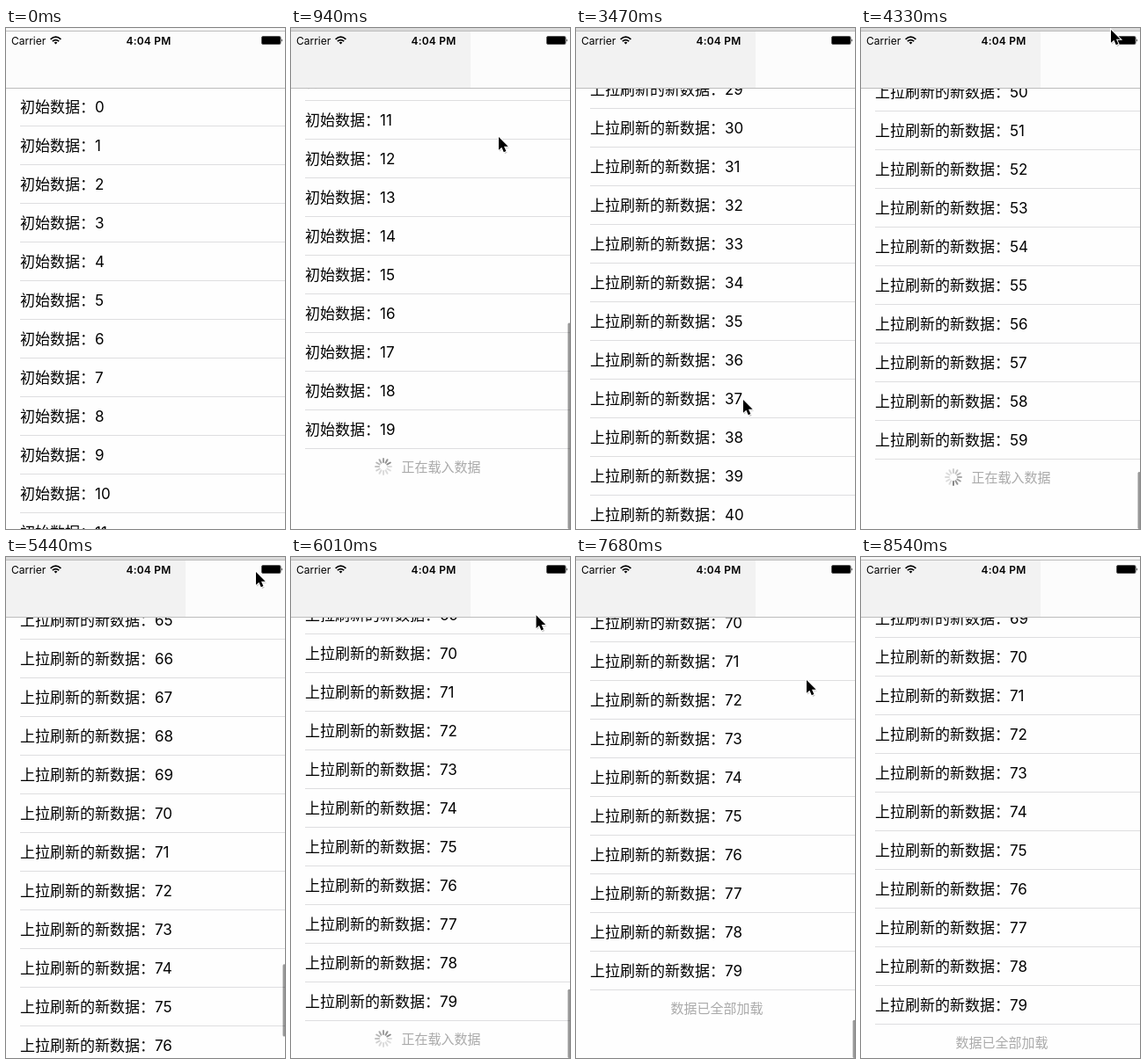
Write an HTML page that moves like this. It is 317 px wide and 570 px high and loops after 8580 ms.

```html
<!DOCTYPE html>
<html lang="zh-CN">
<head>
<meta charset="utf-8">
<title>List</title>
<style>
html, body { margin: 0; width: 100%; height: 100%; overflow: hidden; background: #fefefe; }
svg { display: block; width: 317px; height: 570px; }
text { font-family: Inter, "Noto Sans CJK SC", "Noto Sans CJK", sans-serif; font-size: 17px; fill: #000; white-space: pre; }
.foot { font-size: 15px; fill: #aaa; }
.status { font-size: 12px; }
</style>
</head>
<body>
<svg viewBox="0 0 317 570">
  <rect width="317" height="570" fill="#fefefe"/>
  <g id="rows"></g>
  <g id="footer">
    <g id="spinner" transform="translate(105 20)"></g>
    <text id="loading" class="foot" x="125.5" y="26">正在载入数据</text>
    <text id="done" class="foot" x="160" y="26" text-anchor="middle">数据已全部加载</text>
  </g>
  <rect id="bar" x="314.5" width="3" rx="1.5" fill="#000" fill-opacity=".4"/>
  <rect width="317" height="68" fill="#fcfcfc"/>
  <rect id="shade" y="4" width="204" height="64" fill="#f2f2f2"/>
  <rect y="68" width="317" height="1" fill="#bcbcbc"/>
  <rect id="strip" width="317" height="3"/>
  <rect y="3" width="317" height="1" fill="#bdbdbd"/>
  <text class="status" x="6" y="18.5">Carrier</text>
  <g fill="none" stroke="#000" stroke-width="1.7">
    <path d="M50.6 12.9Q56.5 7.5 62.4 12.9M52.8 15.2Q56.5 11.9 60.2 15.2"/>
    <path d="M54.6 16.5Q56.5 15 58.4 16.5L56.5 18.6Z" fill="#000" stroke="none"/>
  </g>
  <text class="status" x="162" y="18.5" text-anchor="middle" font-weight="600" letter-spacing=".2">4:04 PM</text>
  <rect x="290.5" y="9.5" width="21.5" height="9" rx="1.5" stroke="#555" fill="#000"/>
  <path d="M313.2 12.2q1.8 1.8 0 3.6z"/>
  <g id="cursor">
    <path d="M1 2V16.5L4.5 13.3L7 19L9.6 17.8L7.2 12.4H12Z" opacity=".25"/>
    <path d="M0 0V14.8L3.4 11.7L5.8 17.2L8.4 16L6 10.8H10.7Z" stroke="#fff" stroke-width="2" paint-order="stroke"/>
  </g>
</svg>
<script>
const LOOP = 8580, BEGIN = 300, STEP = 57.7;
const TOP = 68, ROW = 44, FOOT = 40, VIEW = 504, PAGE = 20, PAGES = 4;
const FLICK = 220, LOAD = 1000;
const NS = 'http://www.w3.org/2000/svg';
const $ = id => document.getElementById(id);

// Each flick: start time, and where the pointer grabs and lets go
const flicks = [
  { at: 560, low: [200, 450], high: [236, 124] },
  { at: 2107, low: [205, 450], high: [255, 89] },
  { at: 3860, low: [190, 423], high: [284, 2] },
  { at: 5246, low: [205, 455], high: [284, 17] },
  { at: 7200, low: [231, 500], high: [262, 140] }
];
const exit = [320, 930];

const clamp = u => Math.max(0, Math.min(1, u));
const smooth = u => (u = clamp(u), u * u * (3 - 2 * u));
const mix = (a, b, u) => a + (b - a) * u;

function set(el, attrs) {
  for (const k in attrs) el.setAttribute(k, attrs[k]);
}
function add(parent, tag, attrs) {
  const el = parent.appendChild(document.createElementNS(NS, tag));
  set(el, attrs);
  return el;
}
function show(el, on) {
  el.style.display = on ? '' : 'none';
}

const rows = Array.from({ length: 13 }, () => {
  const g = add($('rows'), 'g', {});
  add(g, 'rect', { x: 16, y: 43, width: 301, height: 1, fill: '#dedee0' });
  return { g, label: add(g, 'text', { x: 16, y: 28 }) };
});
const spokes = Array.from({ length: 12 }, (_, i) => add($('spinner'), 'line', {
  y1: -5, y2: -9, stroke: '#555', 'stroke-width': 2, 'stroke-linecap': 'round',
  transform: `rotate(${i * 30})`
}));

// Bottom offset with the given number of pages
function rest(pages) {
  return pages ? Math.min(pages, PAGES) * PAGE * ROW + FOOT - VIEW : 0;
}

// Accelerate to the bottom, then spring back from beyond it
function offset(t, i) {
  const dt = t - flicks[i].at, past = Math.max(0, dt - FLICK);
  return mix(rest(i), rest(i + 1), clamp(dt / FLICK) ** 1.5)
    + 1.9 * past * Math.exp(-past / 90);
}

function drawRows(s, count) {
  const first = Math.max(0, Math.floor(s / ROW));
  rows.forEach(({ g, label }, k) => {
    const n = first + k;
    show(g, n < count);
    set(g, { transform: `translate(0 ${Math.round(TOP + n * ROW - s)})` });
    const name = (n < PAGE ? '初始数据：' : '上拉刷新的新数据：') + n;
    if (label.textContent !== name) label.textContent = name;
  });
}

function drawFooter(t, s, count, busy) {
  set($('footer'), { transform: `translate(0 ${Math.round(TOP + count * ROW - s)})` });
  show($('spinner'), busy);
  show($('loading'), busy);
  show($('done'), !busy);
  const lead = Math.floor(t * 12 / 1000) + 3;
  spokes.forEach((el, k) => {
    const age = (lead - k + 24) % 12;
    set(el, { opacity: Math.max(.2, .7 - age * .07) });
  });
}

function drawBar(dt, s, count) {
  const content = count * ROW + FOOT, max = content - VIEW;
  const h = VIEW * VIEW / content + 11 - Math.max(0, s - max);
  set($('bar'), {
    y: TOP + (VIEW - 2 - h) * clamp(s / max),
    height: h,
    opacity: Math.min(clamp(dt / 60), clamp((FLICK + 900 - dt) / 250))
  });
}

function drawCursor(t, i) {
  const { at, low, high } = flicks[i];
  const next = i + 1 < flicks.length ? flicks[i + 1].low : exit;
  const up = smooth(1.4 * (t - at) / FLICK);
  const back = smooth((t - at - FLICK - 350) / 700);
  const [x, y] = [0, 1].map(k => mix(mix(low[k], high[k], up), next[k], back));
  set($('cursor'), { transform: `translate(${x} ${y})` });
  show($('cursor'), t >= BEGIN && y < 570);
}

function draw(now) {
  // The screen refreshes in even steps once it starts moving
  const t = now < BEGIN ? 0 : BEGIN + Math.floor((now - BEGIN) / STEP) * STEP;
  const i = Math.max(0, flicks.filter(f => t >= f.at).length - 1);
  const s = offset(t, i);
  const loaded = flicks.filter(f => t >= f.at + FLICK + LOAD).length;
  const count = PAGE * Math.min(PAGES, loaded + 1);
  drawRows(s, count);
  drawFooter(t, s, count, loaded < PAGES);
  drawBar(t - flicks[i].at, s, count);
  drawCursor(t, i);
  show($('shade'), now >= BEGIN);
  set($('strip'), { fill: now < BEGIN || now >= 8540 ? '#f6f6f6' : '#dadada' });
}

const start = performance.now();
function tick() {
  draw((performance.now() - start) % LOOP);
  requestAnimationFrame(tick);
}
tick();
</script>
</body>
</html>
```
